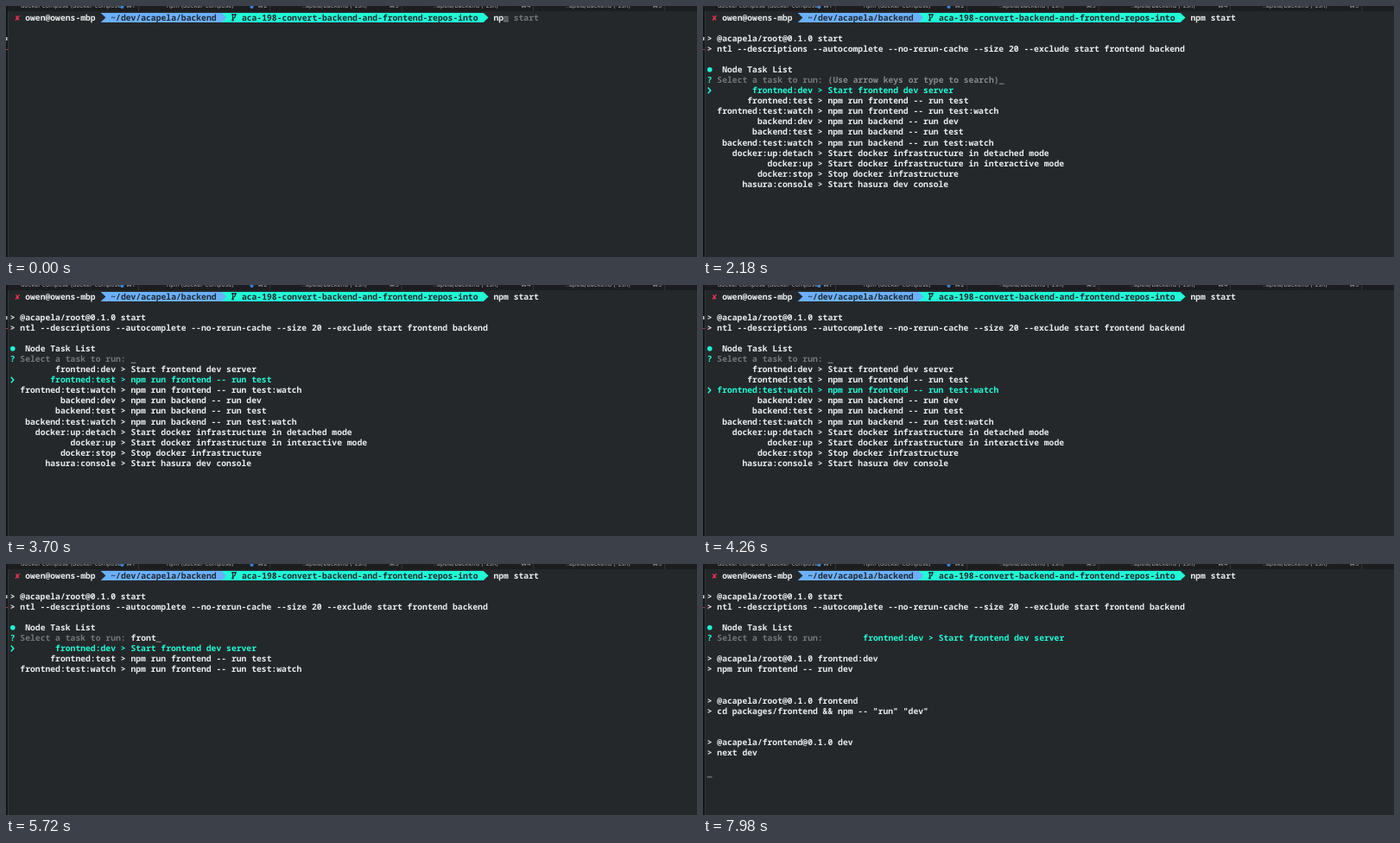
Animation of 800x291 px, one loop 8 s. Source, as an HTML page:

```html
<!DOCTYPE html>
<html lang="en">
<head>
<meta charset="utf-8">
<title>Terminal task list</title>
<style>
  html, body { margin: 0; width: 100%; height: 100%; overflow: hidden; background: #24282b; }
  svg { display: block; width: 100%; height: 100%; }
  text {
    font: 600 9.717px "Noto Sans Mono", "DejaVu Sans Mono", monospace;
    white-space: pre;
    text-rendering: geometricPrecision;
  }
  .tab { font: 7px Inter, "Liberation Sans", sans-serif; fill: #a4a6a8; }
</style>
</head>
<body>
<svg viewBox="0 0 800 291">
  <rect width="800" height="291" fill="#24282b"/>
  <rect width="800" height="6" fill="#1b1d1f"/>
  <rect width="2" height="291" fill="#131517"/>
  <rect x="2" y="6" width="1" height="285" fill="#33373a"/>
  <rect y="36" width="1.5" height="4" fill="#c4c6c7"/>
  <rect y="50" width="2" height="1" fill="#c03a45"/>
  <g id="tabs"></g>
  <g id="prompt"></g>
  <g id="screen"></g>
</svg>
<script>
const LOOP = 8000, CELL = 5.83, ROW = 12.06, LEFT = 4.7;
const WHITE = '#eceded', GREY = '#73777a', CYAN = '#1ffcd6', BLUE = '#6bb0fd', DARK = '#20282e';
const $ = id => document.getElementById(id);
const colX = c => LEFT + c * CELL;
const rowY = r => 13.5 + r * ROW;
const esc = s => s.replace(/&/g, '&amp;').replace(/</g, '&lt;').replace(/>/g, '&gt;');
const text = (row, col, s, fill = WHITE) =>
  `<text x="${colX(col)}" y="${rowY(row) + 3.3}" fill="${fill}">${esc(s)}</text>`;
const path = (d, fill, stroke = 'none', width = 1) =>
  `<path d="${d}" fill="${fill}" stroke="${stroke}" stroke-width="${width}"/>`;

const HEADER = [
  '> @acapela/root@0.1.0 start',
  '> ntl --descriptions --autocomplete --no-rerun-cache --size 20 --exclude start frontend backend'
];
const TASKS = [
  ['frontned:dev', 'Start frontend dev server'],
  ['frontned:test', 'npm run frontend -- run test'],
  ['frontned:test:watch', 'npm run frontend -- run test:watch'],
  ['backend:dev', 'npm run backend -- run dev'],
  ['backend:test', 'npm run backend -- run test'],
  ['backend:test:watch', 'npm run backend -- run test:watch'],
  ['docker:up:detach', 'Start docker infrastructure in detached mode'],
  ['docker:up', 'Start docker infrastructure in interactive mode'],
  ['docker:stop', 'Stop docker infrastructure'],
  ['hasura:console', 'Start hasura dev console']
].map(([name, info]) => name.padStart(19) + ' > ' + info);
const OUTPUT = [
  ['> @acapela/root@0.1.0 frontned:dev', '> npm run frontend -- run dev'],
  ['> @acapela/root@0.1.0 frontend', '> cd packages/frontend && npm -- "run" "dev"'],
  ['> @acapela/frontend@0.1.0 dev', '> next dev']
];

// Each step changes part of the state at its time.
const STEPS = [
  [0, { typed: 2 }],
  [60, { typed: 3 }],
  [400, { typed: 9 }],
  [780, { header: true }],
  [1900, { list: true, hint: true, pick: 0, query: '' }],
  [3500, { hint: false, pick: 1 }],
  [3900, { pick: 2 }],
  [4900, { pick: 0, query: 'f' }],
  [5080, { query: 'fr' }],
  [5220, { query: 'fro' }],
  [5360, { query: 'fron' }],
  [5500, { query: 'front' }],
  [6860, { done: true, output: 0 }],
  [7200, { output: 1 }],
  [7560, { output: 2 }],
  [7860, { output: 3 }]
];

function drawTabs() {
  const titles = ['docker compose (docker-compose)', 'npm (docker-compose)',
    '..apela/backend (-zsh)', '..apela/backend (-zsh)', '..apela/backend (-zsh)'];
  const starts = [17, 186, 343, 495, 648];
  $('tabs').innerHTML = titles.map((s, i) => {
    const x = i * 152.3;
    const dot = i < 2 ? `<circle cx="${134.5 + i * 150}" cy="1" r="2" fill="#3489e8"/>` : '';
    return `<text class="tab" x="${starts[i]}" y="2">${s}</text>` +
      `<text class="tab" x="${x + 139}" y="2">⌘${i + 1}</text>${dot}` +
      `<rect x="${x + 153}" width="1" height="6" fill="#34373a"/>`;
  }).join('');
}

function drawPrompt() {
  const arrow = (from, to, fill) => {
    const a = colX(from), b = colX(to);
    return path(`M${a} 8H${b}l${CELL} 5.5l${-CELL} 5.5H${a}z`, fill);
  };
  $('prompt').innerHTML =
    arrow(42, 94, CYAN) + arrow(18, 42, BLUE) + arrow(17, 18, '#24282b') +
    text(0, 1, '✘', '#ee3155') + text(0, 3, 'owen@owens-mbp') +
    text(0, 20, '~/dev/acapela/backend', DARK) +
    path('M262.5 9.5V17M262.5 14.5Q265.5 14 265.5 11', 'none', DARK, 1.2) +
    path('M261.3 9h2.4v2h-2.4zM264.3 9h2.4v2h-2.4zM261.3 15.5h2.4v2h-2.4z', DARK) +
    text(0, 46, 'aca-198-convert-backend-and-frontend-repos-into', DARK);
}

function drawList(s) {
  let out = `<circle cx="7.8" cy="${rowY(5)}" r="2.8" fill="${CYAN}"/>` +
    text(5, 3, 'Node Task List') + text(6, 0, '?', CYAN) +
    text(6, 2, 'Select a task to run:', GREY);
  if (s.done) {
    out += text(6, 24, TASKS[0], CYAN);
    OUTPUT.slice(0, s.output).forEach((pair, i) =>
      pair.forEach((line, j) => out += text(8 + i * 4 + j, 0, line)));
    return out;
  }
  out += s.hint ? text(6, 24, '(Use arrow keys or type to search)', '#85898b') : text(6, 24, s.query);
  TASKS.filter(task => task.includes(s.query)).forEach((task, i) => {
    const row = 7 + i, on = i === s.pick;
    out += text(row, 2, task, on ? CYAN : WHITE);
    if (on) out += path(`M5.8 ${rowY(row) - 3.3}l3 3.3l-3 3.3`, 'none', CYAN, 1.5);
  });
  return out;
}

function cursorCell(s) {
  if (s.done) return [7 + s.output * 4, 0];
  if (s.list) return [6, 24 + (s.hint ? 34 : s.query.length)];
  return s.header ? null : [0, 96 + s.typed];
}

function drawScreen(s, lit) {
  const command = 'npm start';
  let out = text(0, 96, command.slice(0, s.typed)) +
    text(0, 96 + s.typed, command.slice(s.typed), GREY);
  if (s.header) out += HEADER.map((line, i) => text(2 + i, 0, line)).join('');
  if (s.list) out += drawList(s);
  const cell = cursorCell(s);
  if (lit && cell) {
    const [row, col] = cell;
    out += `<rect x="${colX(col)}" y="${rowY(row) + 3.8}" width="${CELL}" height="1" fill="#909395"/>`;
  }
  $('screen').innerHTML = out;
}

let shown;
function frame(now) {
  const t = now % LOOP;
  const past = STEPS.filter(([at]) => at <= t);
  const last = past[past.length - 1][0];
  const lit = (t - last) % 1300 < 650;
  const key = last + '/' + lit;
  if (key !== shown) {
    shown = key;
    drawScreen(Object.assign({}, ...past.map(([, change]) => change)), lit);
  }
  requestAnimationFrame(frame);
}

drawTabs();
drawPrompt();
frame(0);
</script>
</body>
</html>
```
